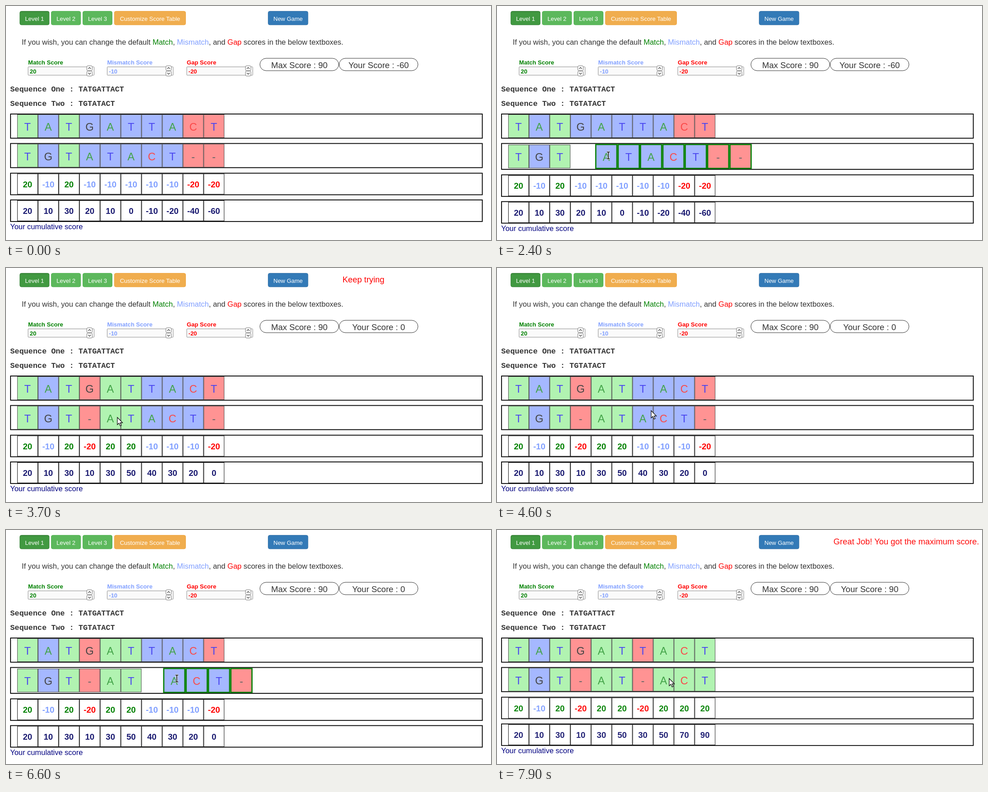
An HTML page for the animation above (8 s loop, 1076x520 px).

```html
<!DOCTYPE html>
<html lang="en">
<head>
<meta charset="utf-8">
<title>Sequence alignment game</title>
<style>
  html, body { margin: 0; width: 100%; height: 100%; overflow: hidden; background: #fff; }
  svg { display: block; width: 1076px; height: 520px; font-family: "Liberation Sans", Arial, sans-serif; }
  text { white-space: pre; }
</style>
</head>
<body>
<svg id="stage" viewBox="0 0 1076 520"></svg>
<script>
const NS = "http://www.w3.org/2000/svg";
const stage = document.getElementById("stage");
const LOOP = 8000, STEP = 100;
const X0 = 24.9, PITCH = 45.95, WIDE = 49.63, GROW = 3.7;
const GREEN = "#008000", BLUE = "#809fff", RED = "#ff0000";
const TOP = "TATGATTACT";
const INK = { T: "#4a46f0", A: "#42a348", G: "#444", C: "#fa4a4a", "-": "#666" };
const KINDS = {
  match: { fill: "#b1f3b1", ink: GREEN, score: 20 },
  mismatch: { fill: "#a5b8ff", ink: BLUE, score: -10 },
  gap: { fill: "#ff9393", ink: RED, score: -20 }
};

function add(parent, tag, attrs, content) {
  const el = document.createElementNS(NS, tag);
  set(el, attrs);
  if (content !== undefined) el.textContent = content;
  parent.appendChild(el);
  return el;
}
function set(el, attrs) {
  for (const k in attrs) el.setAttribute(k, attrs[k]);
}
const group = (parent = stage) => add(parent, "g", {});
const label = (x, y, size, fill, content, more = {}, parent = stage) =>
  add(parent, "text", { x, y, "font-size": size, fill, ...more }, content);
const MID = { "text-anchor": "middle" }, BOLD = { "font-weight": "bold" };

// Rectangle given by its outer edge, border drawn inside.
const frame = (x, y, w, h, line) => ({
  x: x + line / 2, y: y + line / 2, width: w - line, height: h - line, "stroke-width": line
});

function button(x, w, fill, stroke, content) {
  add(stage, "rect", { ...frame(x, 11.2, w, 31.2, 0.95), rx: 3.4, fill, stroke });
  label(x + w / 2, 32.8, 13.02, "#fff", content, MID);
}

function scoreInput(x, ink, title, value) {
  label(x, 130.4, 13.1, ink, title, BOLD);
  add(stage, "rect", { ...frame(x - 0.5, 134.7, 147.5, 19.6, 1), rx: 1, fill: "#fafafa", stroke: "#8c8c8c" });
  label(x + 3.8, 149.6, 13, ink, value, BOLD);
  for (const [y, d] of [[132.3, -1], [144.2, 1]]) {
    add(stage, "rect", { ...frame(x + 129.8, y, 13, 11.9, 1), rx: 2.4, fill: "#fdfdfd", stroke: "#777" });
    const c = y + 5.9;
    add(stage, "path", {
      d: `M${x + 133.3} ${c - d * 1.5} l3 ${d * 3} l3 ${-d * 3}`,
      fill: "none", stroke: "#333", "stroke-width": 1.2
    });
  }
}

function pill(x) {
  add(stage, "rect", { ...frame(x, 115.7, 175.8, 28.6, 1), rx: 13.8, fill: "#fff", stroke: "#333" });
  return label(x + 88, 137.8, 18.62, "#333", "", MID);
}

function rowBox(parent, y, h) {
  return add(parent, "rect", { ...frame(9.2, y, 1048.4, h, 1.85), fill: "#fff", stroke: "#000" });
}

function letterCells(parent, y) {
  return [...TOP].map((_, i) => {
    const g = group(parent), x = X0 + i * PITCH;
    return {
      g,
      box: add(g, "rect", { ...frame(x, y, PITCH, 52.2, 0.95), stroke: "#404040" }),
      text: label(x + PITCH / 2 - 0.2, y + 36.1, 23.7, "#000", "", MID, g)
    };
  });
}

function numberCells(parent, y) {
  return [...TOP].map((_, i) => {
    const x = X0 + i * PITCH;
    add(parent, "rect", { ...frame(x, y, PITCH, 46.2, 0.95), fill: "#fff", stroke: "#000" });
    return label(x + PITCH / 2, y + 30, 18.6, "#191970", "", { ...MID, ...BOLD }, parent);
  });
}

// Static page
button(30.3, 66, "#419941", "#2f7d30", "Level 1");
add(stage, "rect", { x: 31.2, y: 12, width: 64.2, height: 2, rx: 1, fill: "#000", opacity: 0.08 });
button(100, 66, "#5cb85c", "#4cae4c", "Level 2");
button(170, 66, "#5cb85c", "#4cae4c", "Level 3");
button(240, 159, "#f0ad4e", "#eea236", "Customize Score Table");
button(581.2, 89.2, "#337ab7", "#2e6da4", "New Game");

const intro = label(35, 86.4, 16.52, "#333", "");
for (const [content, fill] of [
  ["If you wish, you can change the default ", "#333"], ["Match", GREEN], [", ", "#333"],
  ["Mismatch", BLUE], [", and ", "#333"], ["Gap", RED],
  [" scores in the below textboxes.", "#333"]
]) add(intro, "tspan", { fill }, content);

scoreInput(49, GREEN, "Match Score", "20");
scoreInput(224.5, BLUE, "Mismatch Score", "-10");
scoreInput(401, RED, "Gap Score", "-20");
pill(562.8).textContent = "Max Score : 90";
const yourScore = pill(738.7);

const MONO = { ...BOLD, "font-family": '"Liberation Mono", "Courier New", monospace' };
label(9.2, 189.6, 16.85, "#333", "Sequence One : " + TOP, MONO);
label(9.2, 221.7, 16.85, "#333", "Sequence Two : TGTATACT", MONO);

// Moving parts
rowBox(stage, 239.1, 55.6);
const upper = letterCells(stage, 240.9);
const lowerBox = rowBox(stage, 304.6, 55.6);
const lower = letterCells(stage, 306.4);
const below = group();
const tables = group(below);
rowBox(tables, 370.6, 49.8);
const scores = numberCells(tables, 372.5);
rowBox(tables, 430, 49.8);
const sums = numberCells(tables, 431.9);
label(9.2, 496.3, 16.45, "#000080", "Your cumulative score", {}, below);
const message = label(746.5, 32.2, 18.4, RED, "");

const arrow = add(stage, "path", {
  d: "M0 0V16.2L3.7 12.8L6.4 18.8L9 17.7L6.4 11.8H11.6Z",
  fill: "#fff", stroke: "#000", "stroke-width": 1.15
});
const beam = group();
for (const [stroke, width] of [["#fff", 3.4], ["#000", 1.6]])
  add(beam, "path", { d: "M-3.2 -7.5H3.2M0 -7.5V7.5M-3.2 7.5H3.2", fill: "none", stroke, "stroke-width": width });

// Pointer stops: time, x, y
const STOPS = [
  [500, 234, 4], [700, 231, 48], [900, 222, 150], [1100, 209, 262], [1300, 202, 313],
  [1400, 197, 324], [1500, 192, 335], [1800, 192, 335], [2000, 206, 335], [2200, 233, 334],
  [2400, 247, 332], [3900, 247, 332], [4200, 289, 325], [4500, 339, 318], [4600, 342, 317],
  [4800, 342, 317], [4900, 335, 320], [5000, 335, 320], [5200, 331, 325],
  [5300, 331, 325], [5400, 331, 328], [6300, 331, 328], [6400, 351, 329], [6500, 351, 329],
  [6600, 379, 330], [6700, 379, 330], [6800, 382, 330], [8000, 382, 330]
];
const DRAGS = [
  { from: 1800, to: 3100, first: 3, x: 192 },
  { from: 6200, to: 7300, first: 6, x: 331 }
];

function pointerAt(t) {
  const i = STOPS.findIndex(s => s[0] > t);
  if (i <= 0) return STOPS[0].slice(1);
  const [a, ax, ay] = STOPS[i - 1], [b, bx, by] = STOPS[i];
  const p = (t - a) / (b - a);
  return [ax + (bx - ax) * p, ay + (by - ay) * p];
}

const clamp = p => Math.max(0, Math.min(1, p));
const swing = (t, start, length) => 0.5 - Math.cos(Math.PI * clamp((t - start) / length)) / 2;
const kindOf = (a, b) => KINDS[b === "-" ? "gap" : a === b ? "match" : "mismatch"];

function showLetter(cell, letter, kind) {
  set(cell.box, { fill: kind.fill });
  set(cell.text, { fill: INK[letter] });
  cell.text.textContent = letter;
}

function showAlignment(bottom) {
  let sum = 0;
  [...TOP].forEach((a, i) => {
    const kind = kindOf(a, bottom[i]);
    showLetter(upper[i], a, kind);
    showLetter(lower[i], bottom[i], kind);
    sum += kind.score;
    scores[i].textContent = kind.score;
    set(scores[i], { fill: kind.ink });
    sums[i].textContent = sum;
  });
  yourScore.textContent = "Your Score : " + sum;
}

function layoutLower(drag, shift) {
  const grow = drag ? GROW : 0;
  set(lowerBox, frame(9.2, 304.6, 1048.4, 55.6 + grow, 1.85));
  set(below, { transform: `translate(0 ${grow})` });
  lower.forEach(({ box, text }, i) => {
    const held = drag && i >= drag.first;
    const w = held ? WIDE : PITCH;
    const x = held ? X0 + drag.first * PITCH + (i - drag.first) * WIDE + shift : X0 + i * PITCH;
    set(box, held ? frame(x, 306.4, w, 52.2 + GROW, 2.76) : frame(x, 306.4 + grow / 2, w, 52.2, 0.95));
    set(box, { stroke: held ? "#078007" : "#404040" });
    set(text, { x: x + w / 2 - 0.2, y: 342.5 + grow / 2 });
  });
}

function draw(time) {
  const t = Math.floor((time % LOOP) / STEP) * STEP;
  const [x, y] = pointerAt(t);
  const drag = DRAGS.find(d => t >= d.from && t < d.to);

  showAlignment(t < 3100 ? "TGTATACT--" : t < 7300 ? "TGT-ATACT-" : "TGT-AT-ACT");
  layoutLower(drag, drag ? x - drag.x : 0);

  const fade = t < 3100 ? 1 : t < 7300 ? swing(t, 3080, 600) : swing(t, 7385, 600);
  set(tables, { opacity: t >= 7300 && t < 7500 ? 0 : fade });
  message.textContent = t < 7300 ? "Keep trying" : "Great Job! You got the maximum score.";
  set(message, {
    opacity: t < 3100 ? 0 : t < 7300 ? fade * (1 - swing(t, 3950, 620)) : t < 7500 ? 0 : fade
  });

  const overText = (t >= 1500 && t < 3100) || (t >= 5400 && t < 7300);
  const transform = `translate(${x} ${y})`;
  set(arrow, { transform, visibility: t >= 500 && !overText ? "visible" : "hidden" });
  set(beam, { transform, visibility: overText ? "visible" : "hidden" });
}

const begin = performance.now();
function tick() {
  draw(performance.now() - begin);
  requestAnimationFrame(tick);
}
tick();
</script>
</body>
</html>
```
